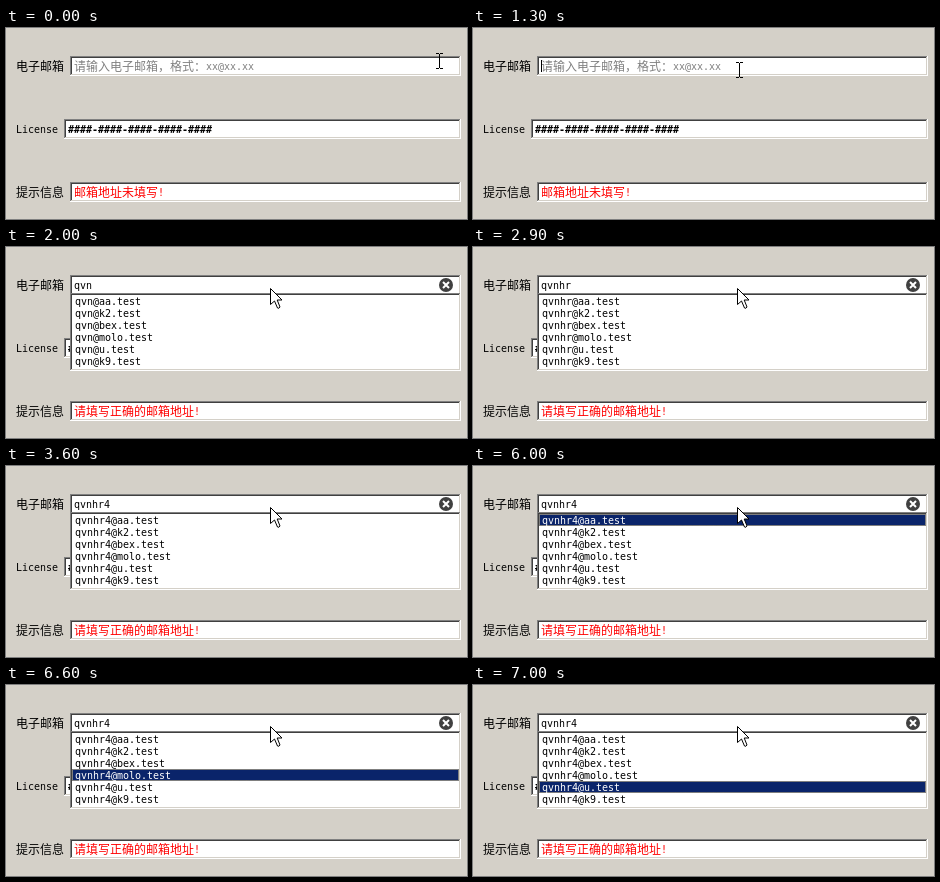
These frames come from a looping animation (461x191 px, 8000 ms). An HTML page with a canvas:

```html
<!DOCTYPE html>
<html lang="zh">
<head>
<meta charset="utf-8">
<style>
html, body { margin: 0; width: 100%; height: 100%; overflow: hidden; background: #d4d0c8; }
canvas { display: block; }
</style>
</head>
<body>
<canvas id="stage" width="461" height="191"></canvas>
<script>
const ctx = document.getElementById('stage').getContext('2d');
const LOOP = 8000;
const USER = 'qvnhr4';
const DOMAINS = ['aa.test', 'k2.test', 'bex.test', 'molo.test', 'u.test', 'k9.test'];
const TYPED_AT = [1400, 1600, 2000, 2400, 2900, 3600];
const SELECTED_AT = [6000, 6200, 6400, 6600, 6800];
const POPUP_AT = 1500;

const passed = (times, t) => times.filter(at => t >= at).length;

function rect(x, y, w, h, color) {
  ctx.fillStyle = color;
  ctx.fillRect(x, y, w, h);
}

// Full-width characters take 12px, Latin ones 6px.
function text(str, x, y, color = '#000', weight = '') {
  ctx.fillStyle = color;
  for (const ch of str) {
    const wide = ch > '\u2000';
    ctx.font = wide
      ? '12px "Noto Sans CJK SC", "Noto Sans CJK", sans-serif'
      : weight + ' 10px "DejaVu Sans Mono", monospace';
    ctx.fillText(ch, x, y + (wide ? 1 : 0));
    x += wide ? 12 : 6;
  }
}

function sunken(x, y, h) {
  const w = 455 - x;
  rect(x, y, w, h, '#fff');
  rect(x, y, w - 1, h - 1, '#808080');
  rect(x + 1, y + 1, w - 2, h - 2, '#d4d0c8');
  rect(x + 1, y + 1, w - 3, h - 3, '#404040');
  rect(x + 2, y + 2, w - 4, h - 4, '#fff');
}

function clearButton() {
  ctx.fillStyle = '#404040';
  ctx.beginPath();
  ctx.arc(440, 38, 7, 0, 7);
  ctx.fill();
  ctx.strokeStyle = '#fff';
  ctx.lineWidth = 2;
  ctx.stroke(new Path2D('M437 35l6 6M443 35l-6 6'));
}

function popup(name, selected) {
  sunken(64, 46, 78);
  DOMAINS.forEach((domain, i) => {
    const y = 48 + 12 * i, on = i === selected;
    if (on) {
      rect(66, y, 387, 12, '#0a246a');
      ctx.strokeStyle = '#f5db95';
      ctx.lineWidth = 1;
      ctx.setLineDash([1, 1]);
      ctx.strokeRect(66.5, y + .5, 386, 11);
      ctx.setLineDash([]);
    }
    text(name + '@' + domain, 69, y + 10, on ? '#fff' : '#000');
  });
}

function beam(x, y) {
  rect(x - 3, y, 3, 1, '#000');
  rect(x + 1, y, 3, 1, '#000');
  rect(x, y + 1, 1, 14, '#000');
  rect(x - 3, y + 15, 3, 1, '#000');
  rect(x + 1, y + 15, 3, 1, '#000');
}

function arrow(x, y) {
  const shape = new Path2D('M0 0V16L4 12.5L7 19.5Q8.5 20.5 9.5 18.5L6.7 11.5H11.5Z');
  ctx.save();
  ctx.translate(x + .5, y + .5);
  ctx.fillStyle = '#fff';
  ctx.strokeStyle = '#000';
  ctx.lineWidth = 1;
  ctx.fill(shape);
  ctx.stroke(shape);
  ctx.restore();
}

function pointer(t) {
  if (t >= POPUP_AT) arrow(t >= 6900 && t < 7000 ? 265 : 264, 41);
  else if (t < 100) beam(433, 25);
  else if (t < 200) beam(320, 30);
  else beam(266, t < 600 ? 33 : 34);
}

function draw(t) {
  const name = USER.slice(0, passed(TYPED_AT, t));
  rect(0, 0, 461, 191, '#d4d0c8');
  text('电子邮箱', 10, 42);
  text('License', 10, 105);
  text('提示信息', 10, 168);
  sunken(64, 28, 20);
  sunken(58, 91, 20);
  sunken(64, 154, 20);
  text('####-####-####-####-####', 62, 105, '#000', 'bold');
  text(name ? '请填写正确的邮箱地址!' : '邮箱地址未填写!', 68, 168, '#f00');

  if (name) {
    text(name, 68, 42);
    clearButton();
  } else {
    text('请输入电子邮箱，格式：xx@xx.xx', 68, 42, '#808080');
    if (t >= 400 && t < 900 || t >= 1300) rect(68, 32, 1, 12, '#000');
  }
  if (t >= POPUP_AT) popup(name, passed(SELECTED_AT, t) - 1);
  pointer(t);
}

const start = performance.now();
function tick() {
  draw((performance.now() - start) % LOOP);
  requestAnimationFrame(tick);
}
tick();
</script>
</body>
</html>
```
